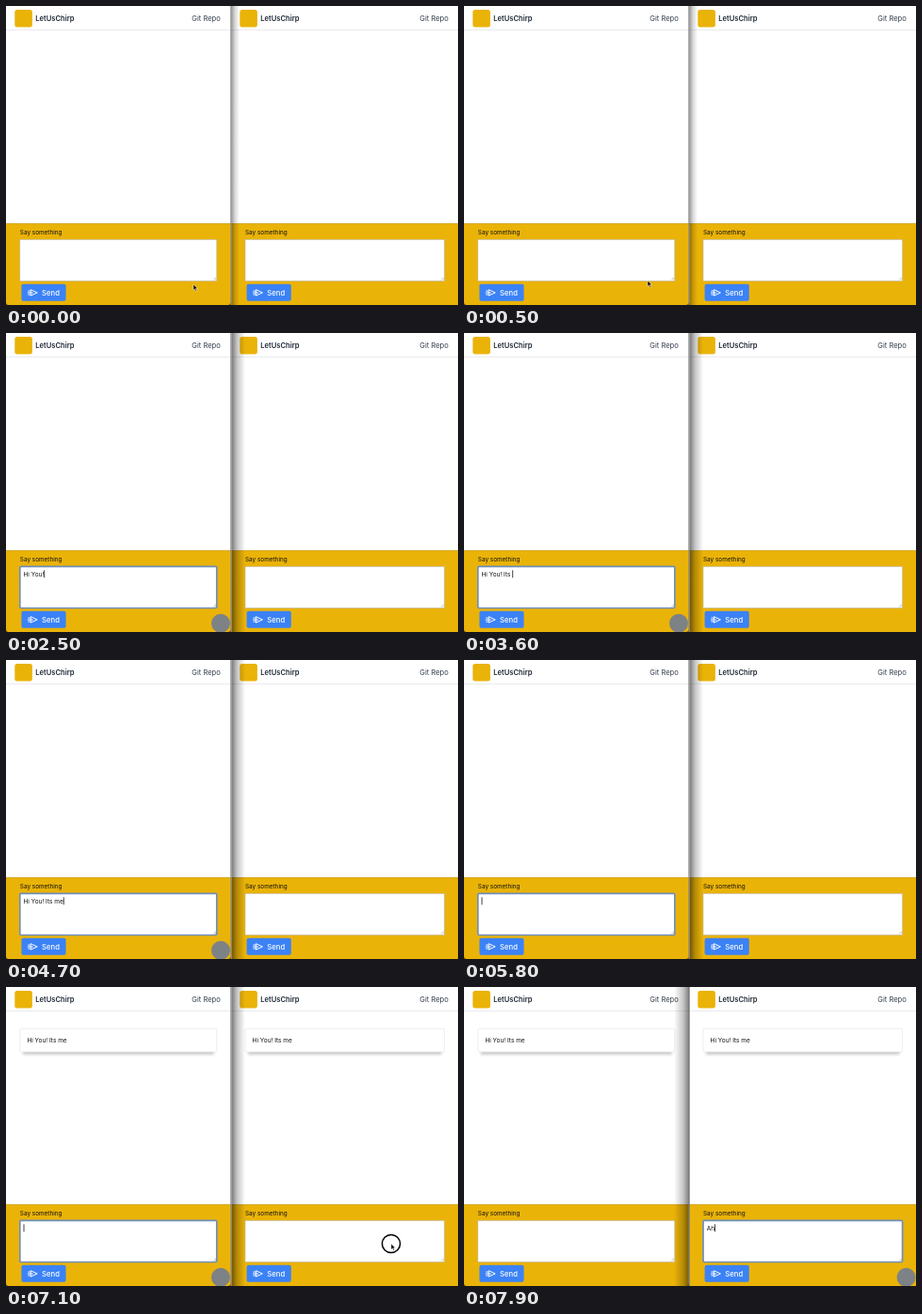
Write an HTML page that moves like this. It is 480 px wide and 318 px high and loops after 8 s.

```html
<!DOCTYPE html>
<html lang="en">
<head>
<meta charset="utf-8">
<title>Chat demo</title>
<style>
html, body { margin: 0; width: 100%; height: 100%; overflow: hidden; background: #fff; }
svg { display: block; width: 100%; height: 100%; }
text { font-family: Inter, Roboto, sans-serif; font-size: 6.5px; fill: #111; white-space: pre; }
.title { font-size: 7.6px; font-weight: 600; fill: #1f2937; }
.link { font-size: 7.6px; fill: #374151; }
.send { font-size: 7.7px; font-weight: 500; fill: #fff; }
.label { font-size: 6.4px; fill: #111; }
</style>
</head>
<body>
<svg id="stage" viewBox="0 0 480 318" preserveAspectRatio="none">
  <defs>
    <linearGradient id="shade">
      <stop offset="0" stop-color="#000" stop-opacity=".5"/>
      <stop offset=".4" stop-color="#000" stop-opacity=".22"/>
      <stop offset="1" stop-color="#000" stop-opacity="0"/>
    </linearGradient>
    <filter id="soft" x="-5%" y="-50%" width="110%" height="200%"><feGaussianBlur stdDeviation="1.6"/></filter>
  </defs>
  <g id="panes"></g>
  <rect id="castRight" x="240" width="14" height="318" fill="url(#shade)"/>
  <rect id="castLeft" x="-239" width="16" height="318" fill="url(#shade)" transform="scale(-1 1)"/>
  <rect x="238.4" width="1.3" height="318" fill="#777"/>
  <path d="M0 315v3h3q-3 0-3-3M238.5 315v3h-3q3 0 3-3" fill="#4b4320"/>
  <g id="badge">
    <circle r="10" fill="#7d8286"/>
  </g>
  <g id="pointer">
    <circle id="ring" r="9.6" fill="none" stroke="#000" stroke-width="1.5"/>
    <path id="arrow" d="M0 0V6.2L1.5 4.9L2.5 7.2L3.5 6.8L2.5 4.6H4.4Z" fill="#000" stroke="#fff" stroke-width=".5"/>
    <path id="beam" d="M-1.4-3.5Q0-3.5 0-2.7Q0-3.5 1.4-3.5M0-2.7V2.7M-1.4 3.5Q0 3.5 0 2.7Q0 3.5 1.4 3.5" fill="none" stroke="#222" stroke-width=".8"/>
  </g>
</svg>
<script>
const $ = id => document.getElementById(id);
const LOOP = 8000, MESSAGE = 'Hi You! Its me', REPLY = 'Ah';
const FOCUS_LEFT = 700, SENT = 5700, POSTED = 6600, FOCUS_RIGHT = 7200;
const KEYS = [1500, 1600, 1800, 2000, 2200, 2300, 2500, 2700, 2900, 3100, 3400, 3600, 4300, 4600];
const REPLY_KEYS = [7700, 7900];

// time, x, y
const PATH = [
  [0, 199, 296], [100, 199, 296], [300, 195, 292], [500, 195, 292],
  [700, 184, 285], [1100, 177, 283], [6000, 177, 283],
  [6500, 420, 274], [6800, 420, 274], [7000, 409, 273], [8000, 409, 273]
];

function pane(id, x, w, icon, link) {
  const end = x + w;
  return `<g>
    <rect x="${icon}" y="4" width="18.6" height="18.4" rx="2.5" fill="#eab308"/>
    <text class="title" x="${icon + 22}" y="15.8">LetUsChirp</text>
    <text class="link" x="${link}" y="15.8">Git Repo</text>
    <rect x="${x - 15}" y="25" width="${w + 30}" height=".8" fill="#e5e7eb"/>
    <g id="card${id}">
      <rect x="${x + 3}" y="60" width="${w - 6}" height="12" fill="#000" opacity=".2" filter="url(#soft)"/>
      <rect x="${x}" y="44.2" width="${w}" height="24.8" rx="1.5" fill="#fff" stroke="#e3e5e8" stroke-width=".7"/>
      <text x="${x + 7.6}" y="59">${MESSAGE}</text>
    </g>
    <rect x="${x - 15}" y="231.4" width="${w + 30}" height="87" fill="#eab308"/>
    <rect x="${x - 15}" y="231.2" width="${w + 30}" height=".7" fill="#c99a0a"/>
    <text class="label" x="${x}" y="243">Say something</text>
    <rect id="box${id}" x="${x}" y="248.3" width="${w}" height="44.2" fill="#fff"/>
    <path d="M${end - 3.6} 291.4l2.8-2.8M${end - 1.9} 291.4l1.1-1.1" stroke="#888" stroke-width=".5"/>
    <text id="draft${id}" x="${x + 3.7}" y="258.7"></text>
    <rect id="caret${id}" y="252.3" width=".8" height="8" fill="#111"/>
    <rect x="${x + 1.6}" y="295.8" width="47.2" height="18" rx="2" fill="#3b82f6"/>
    <path d="M${x + 11.4} 301.7l7 3.2l-7 3.2zM${x + 8.6} 303h2.2M${x + 8} 305h6M${x + 8.6} 307h2.2"
      fill="none" stroke="#fff" stroke-width="1" stroke-linejoin="round"/>
    <text class="send" x="${x + 23.3}" y="307.7">Send</text>
  </g>`;
}

$('panes').innerHTML = '<rect width="480" height="318" fill="#fff"/>' +
  pane('L', 14.8, 209, 9.3, 197.3) + pane('R', 254, 211.6, 248.3, 439.3);

const show = (id, on) => $(id).setAttribute('visibility', on ? 'visible' : 'hidden');
const clamp = v => Math.max(0, Math.min(1, v));
const between = (t, a, b) => t >= a && t < b;

function position(t) {
  const i = PATH.findIndex((p, n) => n && p[0] >= t);
  const a = PATH[i - 1], b = PATH[i];
  const k = clamp((t - a[0]) / (b[0] - a[0])), e = k * k * (3 - 2 * k);
  return [a[1] + (b[1] - a[1]) * e, a[2] + (b[2] - a[2]) * e];
}

function editor(id, x, t, focused, text, events) {
  const box = $('box' + id), draft = $('draft' + id);
  box.setAttribute('stroke', focused ? '#6f8fb8' : '#b9b39c');
  box.setAttribute('stroke-width', focused ? 1.7 : .6);
  box.setAttribute('rx', focused ? 1.2 : 0);
  draft.textContent = text;
  const last = Math.max(...events.filter(e => e <= t));
  show('caret' + id, focused && (t - last) % 1000 < 500);
  $('caret' + id).setAttribute('x', x + (text ? draft.getComputedTextLength() : 0));
}

function render(time) {
  const t = Math.floor(time / 100) * 100;
  const left = between(t, FOCUS_LEFT, FOCUS_RIGHT), right = t >= FOCUS_RIGHT;
  const count = list => list.filter(k => k <= t).length;

  editor('L', 18.6, t, left, t < SENT ? MESSAGE.slice(0, count(KEYS)) : '', [FOCUS_LEFT, ...KEYS, SENT]);
  editor('R', 257.8, t, right, REPLY.slice(0, count(REPLY_KEYS)), [FOCUS_RIGHT, ...REPLY_KEYS]);
  show('cardL', t >= POSTED);
  show('cardR', t >= POSTED);

  show('castRight', !right);
  $('castRight').setAttribute('width', left ? 14 : 8);
  $('castRight').setAttribute('opacity', left ? 1 : .7);
  show('castLeft', right);

  show('badge', between(t, 900, SENT) || between(t, 6100, FOCUS_RIGHT) || t >= 7500);
  $('badge').setAttribute('transform', `translate(${right ? 469.6 : 228} 308.8)`);

  const [x, y] = position(t);
  const visible = t < 1500 || between(t, 6000, 7700);
  const beam = between(t, FOCUS_LEFT, 1500) || between(t, 6000, 6200) || t >= 7300;
  $('pointer').setAttribute('transform', `translate(${x} ${y})`);
  show('arrow', visible && !beam);
  show('beam', visible && beam);
  show('ring', between(t, 7000, 7300));
}

function tick() {
  render(performance.now() % LOOP);
  requestAnimationFrame(tick);
}
tick();
</script>
</body>
</html>
```
